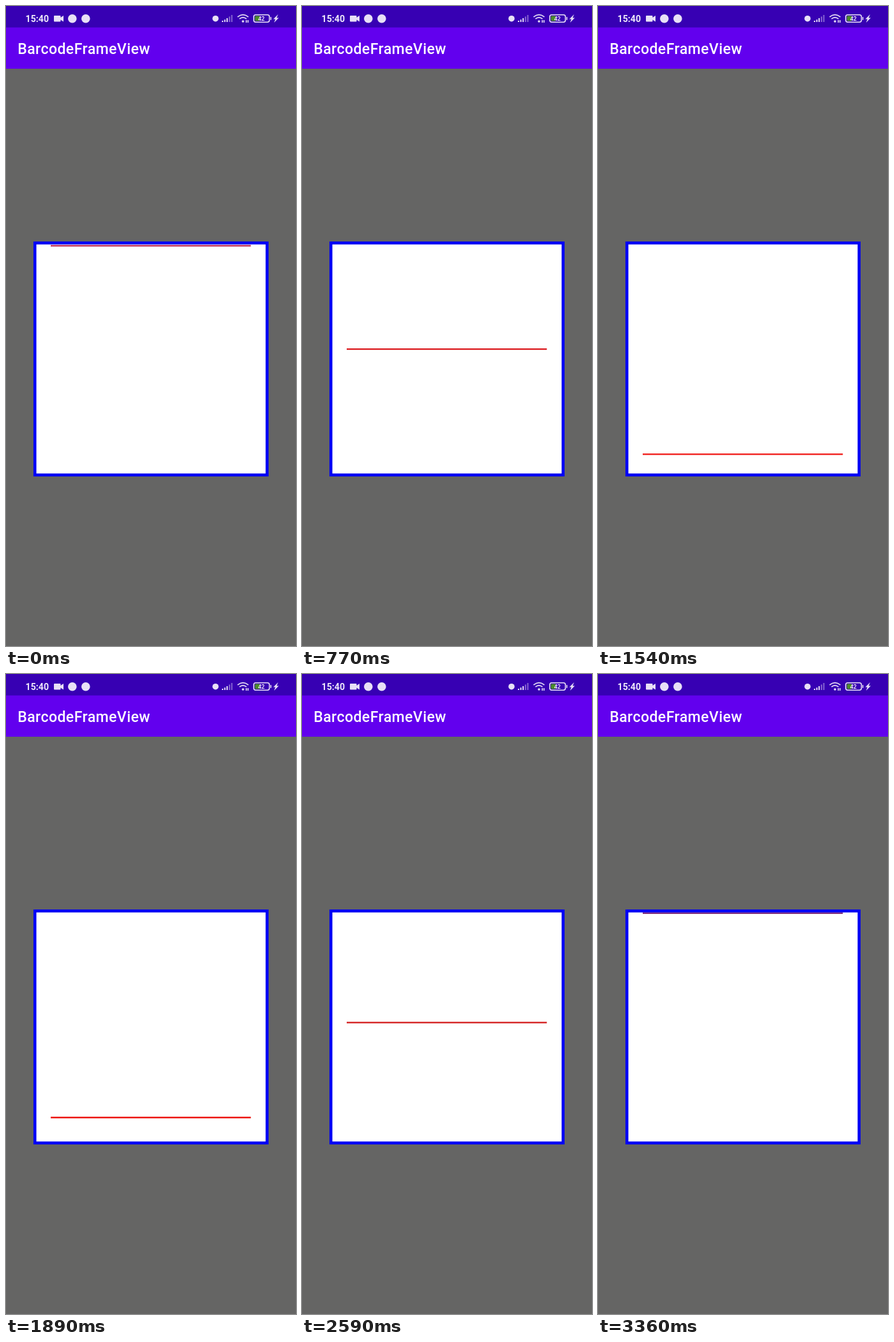
Recreate the animation shown at these times as an HTML page. Size 454 by 1000 pixels, loop 3.43 s.

```html
<!DOCTYPE html>
<html lang="en">
<head>
<meta charset="utf-8">
<title>BarcodeFrameView</title>
<style>
  html, body { margin: 0; width: 100%; height: 100%; overflow: hidden; background: #656564; }
  svg { display: block; width: 100%; height: 100%; }
  text { font-family: Roboto, sans-serif; font-weight: 500; fill: #fff; }
</style>
</head>
<body>
<svg viewBox="0 0 454 1000">
  <rect width="454" height="1000" fill="#656564"/>
  <rect width="454" height="98" fill="#6200ee"/>
  <rect width="454" height="33.5" fill="#3700b3"/>

  <!-- Status bar -->
  <text x="30.5" y="24.9" font-size="14.2" style="font-weight:700;fill:#eee8fa">15:40</text>
  <g fill="#e8e0f6">
    <path d="M76 15h8.5q1 0 1 1v2l4.5-3v9.4l-4.5-3v2q0 1-1 1H76q-1 0-1-1V16q0-1 1-1z"/>
    <circle cx="103.8" cy="19.7" r="6.8"/>
    <circle cx="124.8" cy="19.7" r="6.8"/>
    <circle cx="328" cy="19.7" r="4.8"/>
    <path d="M338 23h2v2h-2zM341.6 21.2h2V25h-2zM345.2 19h2v6h-2z"/>
    <path d="M348.9 16.5h2V25h-2zM352.5 14h2v11h-2z" opacity=".45"/>
    <circle cx="371" cy="24" r="1.8"/>
    <path d="M426 13l-7.5 7.5h3.2l-2 5.5 7.3-7.5h-3.3z"/>
    <rect x="413.8" y="17" width="1.6" height="5" rx=".8"/>
  </g>
  <g fill="none" stroke="#e8e0f6" stroke-width="1.6">
    <path d="M362.5 17.2q8.5-7 17 0M365.5 20.2q5.5-4.6 11 0M376.2 22v4M378.8 22v4"/>
    <rect x="387.8" y="13.8" width="24.6" height="11.4" rx="3.2"/>
  </g>
  <path d="M391 15.6h6v7.8h-6q-1.4 0-1.4-1.4v-5q0-1.4 1.4-1.4z" fill="#4b8a2b"/>
  <text x="399.8" y="22.9" font-size="9" text-anchor="middle">42</text>

  <text x="18.2" y="74.6" font-size="23.1" letter-spacing=".4">BarcodeFrameView</text>

  <!-- Scanner window -->
  <rect x="45" y="370" width="364" height="363" fill="#fff"/>
  <path id="beam" d="M70 0H383.3" stroke-width="2.3"/>
  <rect x="45.25" y="370.25" width="363.5" height="362.5" fill="none" stroke="#0000f4" stroke-width="4.6"/>
</svg>
<script>
  const LOOP = 3430, STEP = 70;
  // Time, beam height, red, green and blue
  const keys = [
    [0, 374.6, 185, 35, 80],
    [490, 475, 205, 24, 32],
    [1120, 612.4, 236, 20, 20],
    [1700, 734, 240, 20, 16],
    [1890, 693, 236, 20, 14],
    [2310, 604.8, 238, 16, 16],
    [2940, 469.2, 176, 32, 32],
    [3360, 373.6, 110, 20, 110]
  ];
  const beam = document.getElementById("beam");

  function sample(time) {
    const next = keys.findIndex(key => key[0] > time);
    if (next < 0) return keys[keys.length - 1];
    const from = keys[next - 1], to = keys[next];
    const mix = (time - from[0]) / (to[0] - from[0]);
    return from.map((value, i) => value + (to[i] - value) * mix);
  }

  function draw() {
    const time = Math.floor(performance.now() % LOOP / STEP) * STEP;
    const [, y, ...color] = sample(time);
    beam.setAttribute("transform", `translate(0 ${y.toFixed(2)})`);
    beam.setAttribute("stroke", `rgb(${color.map(Math.round)})`);
    requestAnimationFrame(draw);
  }
  draw();
</script>
</body>
</html>
```
